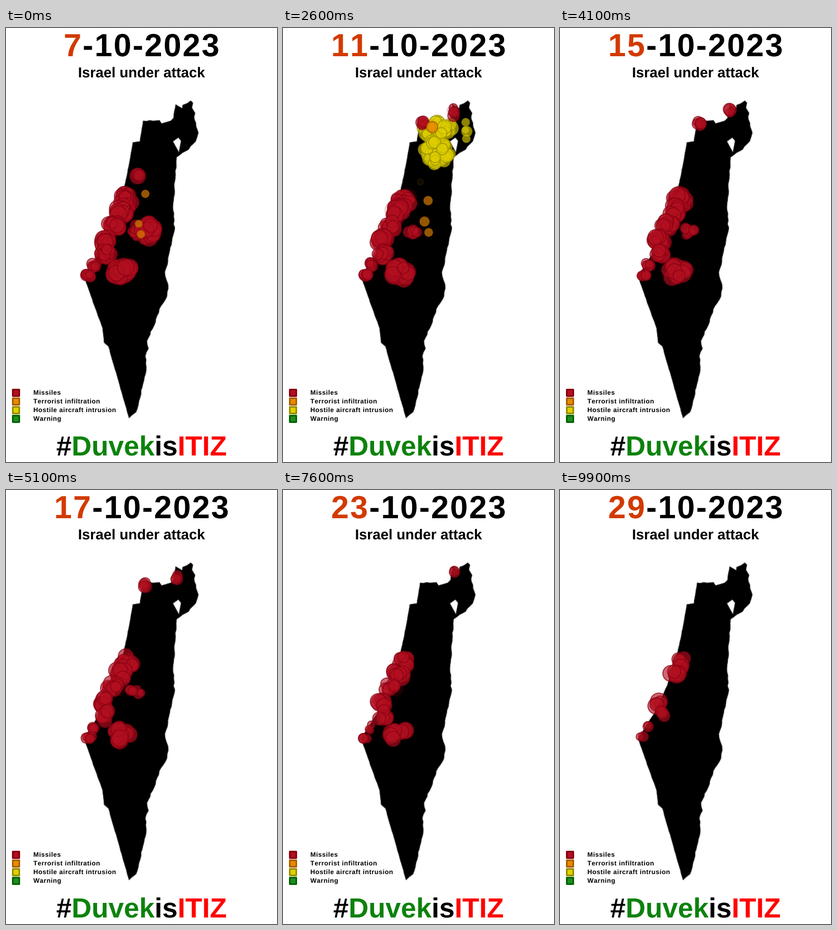
A matplotlib script that plays this animation: 500x800 px, repeating every 10 s.

```python
import numpy as np
import matplotlib.pyplot as plt
from matplotlib.animation import FuncAnimation
from matplotlib.patches import PathPatch, Polygon, Rectangle
from matplotlib.path import Path
from matplotlib.textpath import TextPath

W, H, DPI = 500, 800, 100
PT = 72 / DPI
FRAMES, HOLD = 100, 7
LAST = FRAMES - 1 - HOLD
FIRST_DAY, DAYS = 7, 22
WAVE = 5
FONT = {"family": "Liberation Sans", "weight": "bold"}
rng = np.random.default_rng(7)

RED, ORANGE, YELLOW, GREEN = "Missiles", "Terrorist infiltration", \
    "Hostile aircraft intrusion", "Warning"
FILL = {RED: "#b21020", ORANGE: "#e68a00", YELLOW: "#e0d000", GREEN: "#228b22"}
EDGE = {RED: "#880012", ORANGE: "#aa5f00", YELLOW: "#988e00", GREEN: "#006400"}

fig = plt.figure(figsize=(W / DPI, H / DPI), dpi=DPI, facecolor="white")
ax = fig.add_axes([0, 0, 1, 1])
ax.set_xlim(0, W)
ax.set_ylim(H, 0)
ax.axis("off")


# ---------- text ----------
def right(s, size):
    return TextPath((0, 0), s, size=size, prop=FONT).get_extents().x1


def write(runs, y, size, x=None, track=0.0):
    """Draw coloured runs on a baseline, centred unless x is given."""
    bar = right("H", size)
    chars = [(c, color) for s, color in runs for c in s]
    steps = [right(c + "H", size) - bar + track for c, _ in chars]
    pen = (W - sum(steps) + track) / 2 if x is None else x
    glyphs = {}
    for (c, color), step in zip(chars, steps):
        if c != " ":
            p = TextPath((0, 0), c, size=size, prop=FONT)
            glyphs.setdefault(color, []).append(
                Path(p.vertices * (1, -1) + (pen, y), p.codes))
        pen += step
    return [ax.add_patch(PathPatch(Path.make_compound_path(*paths),
                                   fc=color, lw=0, zorder=5))
            for color, paths in glyphs.items()]


titles = {day: write([(str(day), "#d23a00"), ("-10-2023", "black")],
                     52, 59, track=2.3)
          for day in range(FIRST_DAY, FIRST_DAY + DAYS + 1)}
write([("Israel under attack", "black")], 91, 26.5)
write([("#", "black"), ("Duvek", "#0d820d"), ("is", "black"),
       ("ITIZ", "#ff0000")], 788, 51)

for row, kind in enumerate(FILL):
    y = 671.5 + 16 * row
    ax.add_patch(Rectangle((11.5, y - 6), 12, 12, fc=FILL[kind],
                           ec=EDGE[kind], lw=3 * PT, joinstyle="round"))
    write([(kind, "black")], y + 4.5, 12, x=50.5, track=0.55)

# ---------- map ----------
NORTH = [(253, 171), (283, 170), (287, 176), (304, 171), (309, 166),
         (313, 141), (325, 148), (326, 142), (341, 134), (345, 138),
         (343, 147), (349, 157), (347, 164), (355, 193), (350, 209),
         (337, 224), (315, 238)]
EAST = [(315, 238), (313, 270), (308, 330), (311, 373), (303, 405),
        (298, 436), (293, 450), (299, 472), (297, 495), (283, 518),
        (276, 542), (260, 577), (263, 591), (257, 605), (259, 625),
        (248, 680), (240, 708), (227, 719)]
COAST = [(227, 719), (189, 587), (181, 580), (178, 553), (163, 512),
         (144, 458), (176, 408), (198, 360), (217, 299), (224, 267),
         (234, 211), (247, 209), (253, 171)]
LAKE = [(308, 209), (318, 202), (323, 208), (319, 229), (314, 220)]


def rough(points, amount, gap=6):
    """Break an outline into short steps and shake the new corners."""
    out = []
    for a, b in zip(np.array(points), np.array(points[1:])):
        cuts = max(1, int(np.hypot(*(b - a)) / gap))
        for j in range(cuts):
            shake = rng.uniform(-amount, amount, 2) if j else 0
            out.append(a + (b - a) * j / cuts + shake)
    return out


land = rough(NORTH, 1.0) + rough(EAST, 1.2) + rough(COAST, 0.3)
for shape, color in ((land, "black"), (LAKE, "white")):
    ax.add_patch(Polygon(shape, fc=color, ec="#555555", lw=PT))

# ---------- alerts ----------
# kind, x, y, half width, half height, radius, count, first and last step
SITES = [
    (YELLOW, 285, 186, 31, 14, 12, 38, 20, 20),
    (YELLOW, 284, 230, 27, 23, 12, 46, 20, 20),
    (YELLOW, 338, 180, 2, 32, 9, 4, 20, 20),
    (RED, 242, 272, 4, 3, 13, 3, 0, 10),
    (RED, 256, 176, 5, 5, 10, 6, 10, 60),
    (RED, 314, 156, 3, 10, 10, 4, 10, 70),
    (RED, 238, 374, 12, 11, 9, 9, 0, 55),
    (RED, 263, 374, 14, 14, 14, 22, 0, 10),
    (RED, 221, 318, 13, 13, 13, 26, 0, LAST),
    (RED, 212, 338, 9, 11, 14, 22, 0, LAST),
    (RED, 198, 364, 11, 9, 13, 16, 0, 75),
    (RED, 182, 392, 8, 10, 14, 16, 0, LAST),
    (RED, 183, 416, 10, 10, 12, 13, 0, LAST),
    (RED, 162, 437, 5, 6, 9, 8, 0, LAST),
    (RED, 153, 456, 7, 3, 9, 9, 0, LAST),
    (RED, 216, 450, 18, 14, 14, 24, 0, 75),
    (ORANGE, 260, 350, 22, 75, 8, 3, 0, 25),
    (ORANGE, 275, 182, 1, 1, 12, 2, 20, 20),
]


def disc(n):
    """Random points spread evenly over the unit disc."""
    a, d = rng.uniform(0, 2 * np.pi, n), np.sqrt(rng.uniform(size=n))
    return np.stack([d * np.cos(a), d * np.sin(a)], axis=1)


pos, radius, born, gone, kinds = [], [], [], [], []
for step in range(0, LAST, WAVE):
    for kind, x, y, w, h, r, count, first, last in SITES:
        if not first <= step <= last:
            continue
        n = round(count * (1.15 - 0.95 * step / LAST))
        pos.extend(disc(n) * (w, h) + (x, y))
        radius.extend(r * rng.uniform(0.75, 1.15, n))
        born.extend(step - rng.uniform(2, 3.5, n))
        gone.extend(step + rng.uniform(1.8, 2.8, n))
        kinds.extend([kind] * n)

pos, radius, born, gone = map(np.array, (pos, radius, born, gone))
to_rgba = plt.matplotlib.colors.to_rgba_array
fill = to_rgba([FILL[k] for k in kinds])
edge = to_rgba([EDGE[k] for k in kinds])
dots = ax.scatter([], [], zorder=3, linewidths=1.8 * PT)


def draw(i):
    step = max(0, i - HOLD)
    today = FIRST_DAY + step * DAYS // LAST
    for day, runs in titles.items():
        for run in runs:
            run.set_visible(day == today)

    grow = 1 - (1 - np.clip((step - born) / 1.5, 0, 1)) ** 2
    fade = np.clip(1 - (step - gone) / 1.5, 0, 1)
    on = (grow > 0.05) & (fade > 0)
    f, e = fill[on], edge[on]
    f[:, 3] = 0.64 * fade[on]
    e[:, 3] = 0.72 * fade[on]
    dots.set_offsets(pos[on])
    dots.set_sizes((2 * radius[on] * grow[on] * PT) ** 2)
    dots.set_facecolors(f)
    dots.set_edgecolors(e)
    return [dots]


anim = FuncAnimation(fig, draw, frames=FRAMES, interval=100,
                     init_func=lambda: draw(0), repeat=True, repeat_delay=0)
plt.show()
```
